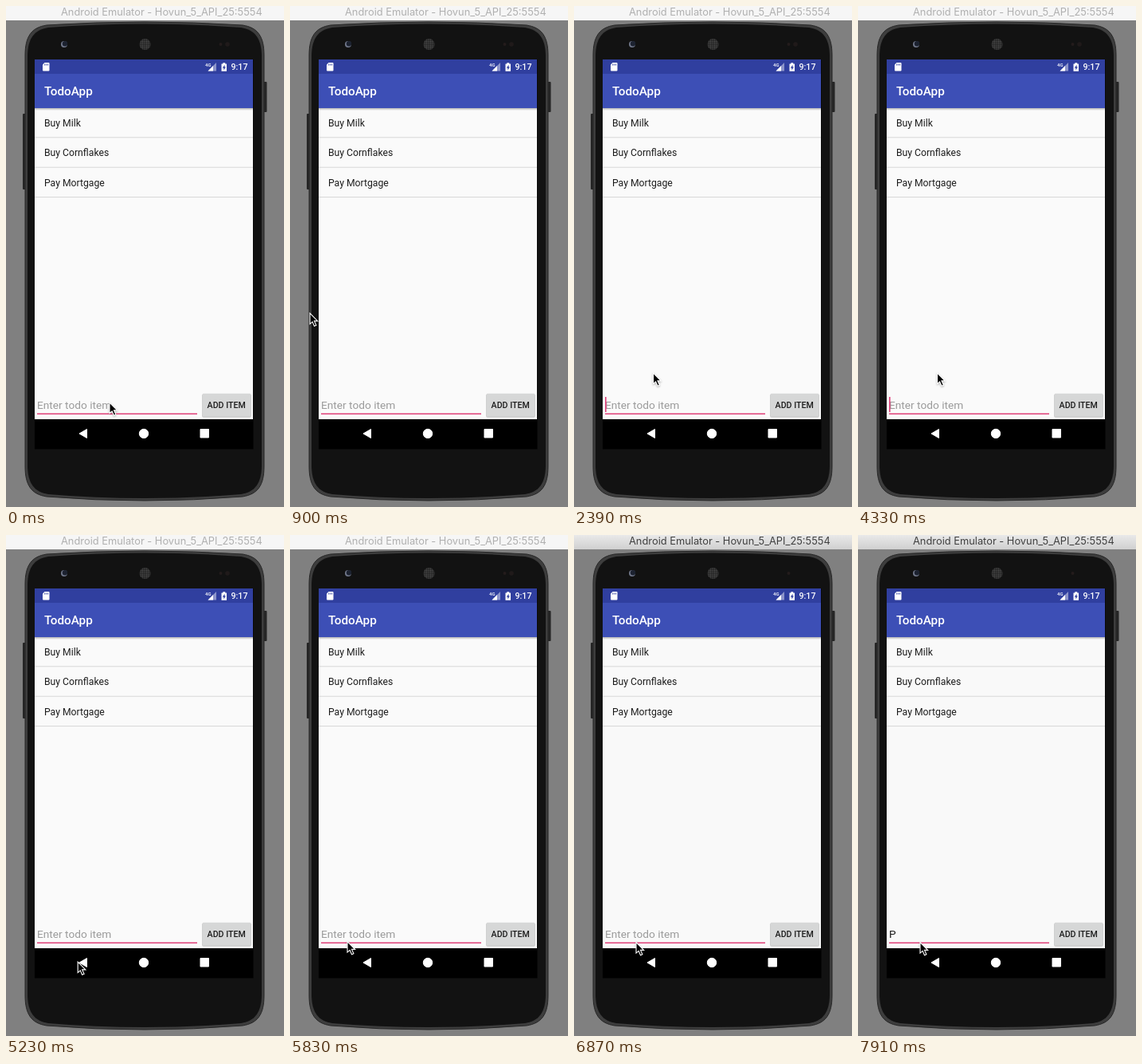
Write an HTML page that moves like this. It is 349 px wide and 628 px high and loops after 8000 ms.

```html
<!DOCTYPE html>
<html lang="en">
<head>
<meta charset="utf-8">
<title>Todo list</title>
<style>
html, body { margin: 0; width: 100%; height: 100%; overflow: hidden; background: #808080; }
svg { display: block; width: 349px; height: 628px; }
text { font-family: Roboto, sans-serif; white-space: pre; }
.bar { font: 12.85px Inter, sans-serif; }
.item { font-size: 12.2px; fill: #1c1c1c; }
.field { font-size: 13.7px; }
.medium { font-weight: 500; }
</style>
</head>
<body>
<svg viewBox="0 0 349 628">
  <defs>
    <linearGradient id="barFill" x2="0" y2="1">
      <stop stop-color="#e9e9e9"/><stop offset="1" stop-color="#d0d0d0"/>
    </linearGradient>
    <linearGradient id="drop" x2="0" y2="1">
      <stop stop-color="#000" stop-opacity=".28"/><stop offset="1" stop-color="#000" stop-opacity="0"/>
    </linearGradient>
    <pattern id="mesh" width="2.4" height="2.4" patternUnits="userSpaceOnUse">
      <circle cx="1.2" cy="1.2" r=".75" fill="#555"/>
    </pattern>
  </defs>

  <!-- window -->
  <rect width="349" height="628" fill="#808080"/>
  <rect id="bar" width="349" height="18"/>
  <text id="title" class="bar" x="69" y="12">Android Emulator - Hovun_5_API_25:5554</text>

  <!-- phone -->
  <rect x="21" y="135" width="5" height="95" rx="1" fill="#262626"/>
  <rect x="322" y="95" width="5.5" height="38" rx="1" fill="#262626"/>
  <path d="M24 62C24 38 32 27 51 24Q112 20 174 20T297 24C316 27 324 38 324 62V577C324 601 316 612 297 615Q236 620 174 620T51 615C32 612 24 601 24 577Z" fill="#3d3d3d" stroke="#262626"/>
  <path d="M27 62C27.5 41 35 30 53 27Q112 22.5 174 22.5T295 27C313 30 320.5 41 321 62V577C320.5 598 313 609 295 612Q236 617 174 617T53 612C35 609 27.5 598 27 577Z" fill="#121212"/>
  <circle cx="73" cy="48" r="4" fill="#70778a"/>
  <circle cx="74" cy="47.2" r="3.2" fill="#1c2230"/>
  <circle cx="174.5" cy="48" r="7.2" fill="#222"/>
  <circle cx="174.5" cy="48" r="7" fill="url(#mesh)"/>
  <circle cx="269.5" cy="48" r="2" fill="#241c1c"/>
  <circle id="sensor" cx="278" cy="48" r="2.8" fill="#201a1a"/>

  <!-- screen -->
  <rect x="36" y="67" width="274.5" height="488.5"/>
  <rect x="36" y="67" width="274" height="18" fill="#303f9f"/>
  <rect id="page" x="36" y="128" width="274" height="390"/>
  <rect x="36" y="85" width="274" height="43" fill="#3d4fb6"/>
  <rect x="36" y="128" width="274" height="3" fill="url(#drop)"/>
  <text class="medium" x="48" y="111.7" font-size="15.3" fill="#fff">TodoApp</text>

  <!-- status icons -->
  <g fill="#fff">
    <path d="M48.5 71H53.5Q54.5 71 54.5 72V80.5Q54.5 81.5 53.5 81.5H47Q46 81.5 46 80.5V73.5Z"/>
    <path d="M48.7 72.5V74.5M50.6 72.5V74.5M52.5 72.5V74.5" stroke="#303f9f" stroke-width=".9"/>
    <text class="medium" x="250" y="76" font-size="6">4G</text>
    <path d="M264 71V81.5H253.5Z" opacity=".45"/>
    <path d="M260 75V81.5H253.5Z"/>
    <path d="M270.5 72.5H272.3V71.3H275.2V72.5H277V81.8H270.5Z"/>
    <path d="M274.5 73.7L271.8 77.7H273.4V80.6L275.9 76.6H274.5Z" fill="#303f9f"/>
    <text class="medium" x="282.5" y="80.3" font-size="10.65">9:17</text>
  </g>

  <g id="list"></g>

  <!-- entry row -->
  <text id="hint" class="field" x="39" y="505" fill="#9b9b9b">Enter todo item</text>
  <text id="typed" class="field" x="39" y="505" fill="#1c1c1c">P</text>
  <rect x="39" y="510.5" width="201" height="1.5" fill="#e04079"/>
  <rect id="caret" y="490" width="1.6" height="19" fill="#e04079"/>
  <rect x="246" y="486.5" width="62" height="29.3" rx="2" opacity=".2"/>
  <rect x="246.5" y="485.7" width="61" height="28.8" rx="1.5" fill="#d6d7d7"/>
  <text class="medium" x="276.7" y="503.5" font-size="10.65" text-anchor="middle" fill="#1c1c1c">ADD ITEM</text>

  <!-- navigation -->
  <g fill="#fff" stroke="#fff" stroke-linejoin="round">
    <path d="M92 536L101.5 530.5V541.5Z"/>
    <circle cx="173" cy="536" r="5.7"/>
    <rect x="244" y="530.5" width="10.5" height="10.5"/>
  </g>

  <path id="pointer" d="M0 0V13.6L3.1 10.8L5.5 16.3L7.9 15.3L5.5 9.9H9.7Z" stroke="#fff" stroke-width="1.1" style="filter:drop-shadow(0 1px 1px rgba(0,0,0,.3))"/>
</svg>
<script>
const LOOP = 8000, TICK = 149.2, FOCUS = 40, TYPE = 50;
const BLINK = 500, BLINK_START = 315;
const $ = id => document.getElementById(id);

// Pointer strokes: smooth curves through evenly timed points.
const strokes = [
  { from: 2, to: 14, path: [[130, 497], [76, 522], [25, 385], [46, 184], [85, 332.5], [99, 428], [99.5, 460]] },
  { from: 32, to: 39, path: [[99.5, 460], [94, 522], [79, 552], [72, 509.5]] },
  { from: 39, to: 40, path: [[72, 509.5], [74, 503.5]] },
  { from: 44, to: 46, path: [[74, 503.5], [78, 510.5]] }
];

function spline(a, b, c, d, u) {
  return b + u / 2 * (c - a + u * (2 * a - 5 * b + 4 * c - d + u * (3 * (b - c) + d - a)));
}

function along(path, p) {
  const last = path.length - 1;
  const i = Math.min(Math.floor(p * last), last - 1);
  const at = k => path[Math.max(0, Math.min(last, k))];
  return [0, 1].map(n => spline(at(i - 1)[n], at(i)[n], at(i + 1)[n], at(i + 2)[n], p * last - i));
}

function pointerAt(tick) {
  const { from, to, path } = strokes.filter(s => s.from <= tick).pop() || strokes[0];
  return along(path, Math.max(0, Math.min(1, (tick - from) / (to - from))));
}

$("list").innerHTML = ["Buy Milk", "Buy Cornflakes", "Pay Mortgage"].map((name, i) => {
  const y = 150.7 + i * 37.4;
  return `<text class="item" x="48" y="${y}">${name}</text>
    <rect x="36" y="${y + 13.6}" width="274" height="1" fill="#d8d8d8"/>`;
}).join("");

function show(id, on) {
  $(id).setAttribute("visibility", on ? "visible" : "hidden");
}

function draw(t) {
  const tick = Math.floor((t + 5) / TICK);
  const focused = tick >= FOCUS, typed = tick >= TYPE;
  $("pointer").setAttribute("transform", `translate(${pointerAt(tick)})`);
  $("bar").setAttribute("fill", focused ? "url(#barFill)" : "#f6f6f6");
  $("title").setAttribute("fill", focused ? "#404040" : "#b0b0b0");
  $("page").setAttribute("fill", focused ? "#f9f9f9" : "#fafafa");
  $("caret").setAttribute("x", typed ? 47.5 : 39);
  show("caret", Math.floor((tick * TICK - BLINK_START) / BLINK) % 2 === 0);
  show("sensor", !focused);
  show("hint", !typed);
  show("typed", typed);
}

function frame() {
  draw(performance.now() % LOOP);
  requestAnimationFrame(frame);
}
frame();
</script>
</body>
</html>
```
